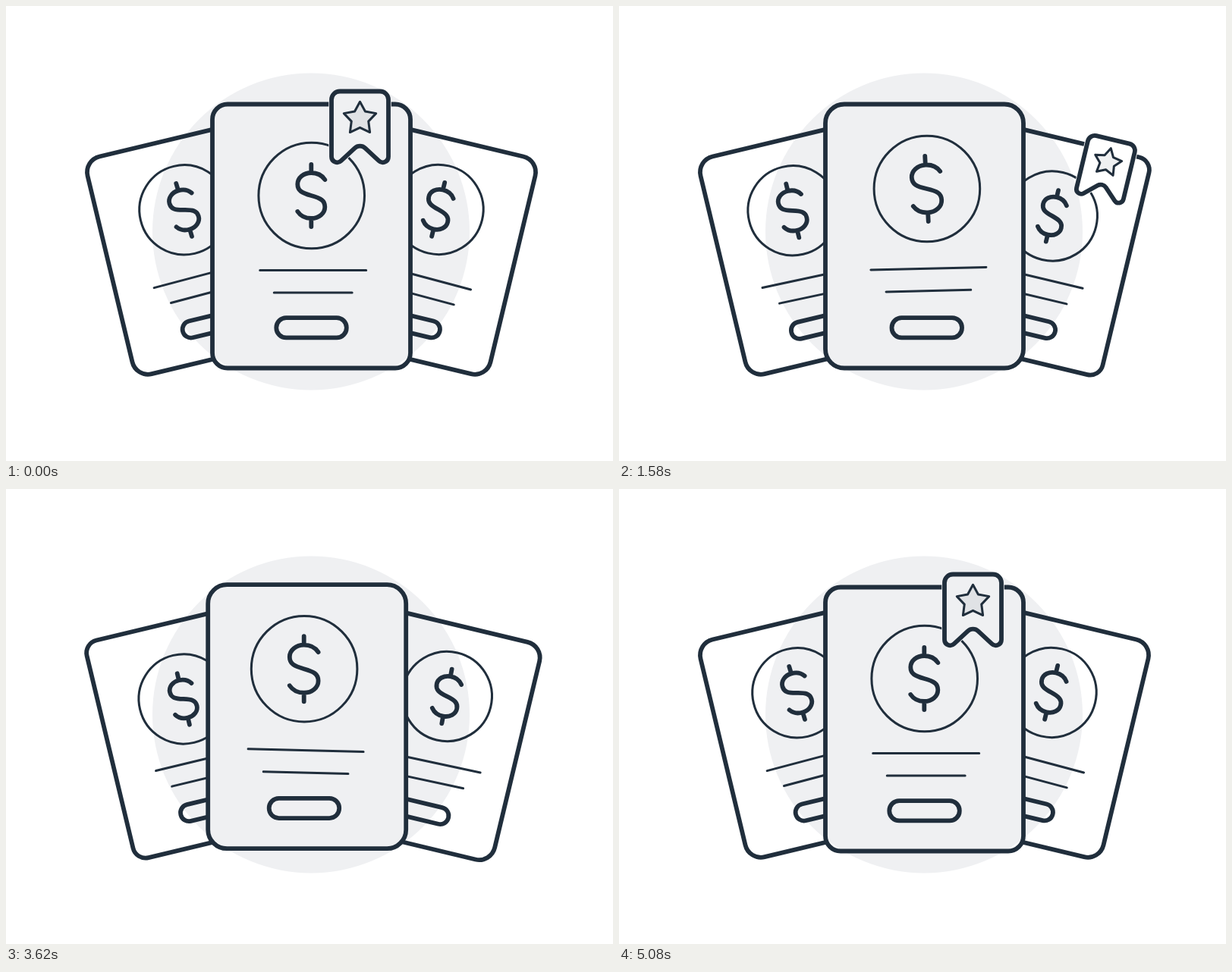
An HTML page with a canvas for the animation above (5100 ms loop, 800 by 600 pixels).

```html
<!DOCTYPE html>
<html lang="en">
<head>
<meta charset="utf-8">
<title>Pricing cards</title>
<style>
  html, body { margin: 0; width: 100%; height: 100%; overflow: hidden; background: #fff; }
  canvas { display: block; width: 800px; height: 600px; }
</style>
</head>
<body>
<canvas id="stage" width="800" height="600"></canvas>
<script>
const LOOP = 5100;
const STARTS = [220, 1920, 3570];
const INK = '#202e3c';
const BOLD = 5.8, THIN = 3;
const CENTRE = 0, RIGHT = 1, LEFT = 2;
const ctx = document.getElementById('stage').getContext('2d');
ctx.lineCap = ctx.lineJoin = 'round';

// In list order each card sits one slot further on.
const cards = [
  { radius: 20, shift: 0.2, ringY: -53.5, lineY: 45, half: 70, sign: 1, signTurn: 0, ribbon: true },
  { radius: 25, shift: -3.6, ringY: -63, lineY: 44.5, half: 76, sign: 1.05, signTurn: 0 },
  { radius: 25, shift: 3.4, ringY: -62.5, lineY: 42.7, half: 76, sign: 1.05, signTurn: -3 }
];

const radians = degrees => degrees * Math.PI / 180;

// Cubic ease in and out between two times.
function ease(t, start, end) {
  const u = Math.min(1, Math.max(0, (t - start) / (end - start)));
  return u < 0.5 ? 4 * u ** 3 : 1 - 4 * (1 - u) ** 3;
}

// Cards are filled with the backdrop itself, so they hide each other but not the disc.
function makeBackdrop() {
  const c = document.createElement('canvas');
  c.width = 800;
  c.height = 600;
  const g = c.getContext('2d');
  g.fillStyle = '#fff';
  g.fillRect(0, 0, 800, 600);
  g.fillStyle = '#eff0f2';
  g.beginPath();
  g.arc(402, 297.5, 209, 0, 7);
  g.fill();
  return ctx.createPattern(c, 'no-repeat');
}
const backdrop = makeBackdrop();

// The fan is symmetric, apart from a small drift in the last state.
function rest(state, slot) {
  const side = [0, 1, -1][slot];
  const drift = state === 2 ? [-1, 1, 0][slot] : 0;
  return {
    x: 402.5 + 158 * side + 5.8 * drift,
    y: 303.5 + 17.5 * Math.abs(side) + 3.3 * drift,
    scale: side ? 0.847 : 1,
    turn: 13.5 * side
  };
}

// Progress of each property of a card on its way out of a slot.
function progress(slot, t) {
  if (slot === CENTRE) {
    return {
      x: ease(t, 325, 930),
      y: ease(t, 200, 1040),
      scale: ease(t, 215, 1010),
      turn: ease(t, 412, 870)
    };
  }
  // The left card is nudged first, then comes in.
  const p = slot === RIGHT
    ? ease(t, 3, 973)
    : 0.046 * ease(t, 0, 500) + 0.954 * ease(t, 545, 1060);
  return { x: p, y: p, scale: p, turn: p };
}

function poseOf(state, slot, t) {
  const from = rest(state, slot), to = rest((state + 1) % 3, (slot + 1) % 3);
  const p = progress(slot, t), pose = {};
  for (const key in from) pose[key] = from[key] + (to[key] - from[key]) * p[key];
  if (slot === LEFT) pose.y -= 8 * Math.sin(Math.PI * ease(t, 400, 1360));
  return pose;
}

// Builds a path in the current space, then paints it in screen space so strokes keep their weight.
function paint(trace, width, fill, halo) {
  ctx.save();
  ctx.beginPath();
  trace();
  ctx.resetTransform();
  if (halo) {
    ctx.strokeStyle = backdrop;
    ctx.lineWidth = halo;
    ctx.stroke();
  }
  if (fill) {
    ctx.fillStyle = fill;
    ctx.fill();
  }
  ctx.strokeStyle = INK;
  ctx.lineWidth = width;
  ctx.stroke();
  ctx.restore();
}

// Runs a drawing inside a moved, turned and scaled space.
function within({ x, y, scale = 1, turn = 0 }, drawInside) {
  ctx.save();
  ctx.translate(x, y);
  ctx.rotate(radians(turn));
  ctx.scale(scale, scale);
  drawInside();
  ctx.restore();
}

// Two halves, each the other turned by 180 degrees.
function traceDollar() {
  for (const d of [1, -1]) {
    ctx.moveTo(0, 0);
    ctx.bezierCurveTo(12.5 * d, 3.5 * d, 18 * d, 6.5 * d, 18 * d, 15 * d);
    ctx.bezierCurveTo(18 * d, 23.5 * d, 10 * d, 30 * d, 0, 30 * d);
    ctx.bezierCurveTo(-8 * d, 30 * d, -14 * d, 27 * d, -18 * d, 21 * d);
    ctx.moveTo(0, 30 * d);
    ctx.lineTo(0, 41 * d);
  }
}

function traceRibbon() {
  const w = 37.5, top = -47, tip = 56.5, notch = 21.5;
  ctx.moveTo(0, top);
  ctx.arcTo(w, top, w, 0, 11);
  ctx.arcTo(w, tip, 0, notch, 7.5);
  ctx.arcTo(0, notch, -w, tip, 10);
  ctx.arcTo(-w, tip, -w, 0, 7.5);
  ctx.arcTo(-w, top, 0, top, 11);
  ctx.closePath();
}

function traceStar() {
  for (let i = 0; i < 10; i++) {
    const r = i % 2 ? 11.8 : 22.3, a = i * Math.PI / 5;
    ctx.lineTo(r * Math.sin(a), -11 - r * Math.cos(a));
  }
  ctx.closePath();
}

function drawRibbon() {
  paint(traceRibbon, BOLD, backdrop, 7.5);
  paint(traceStar, THIN, 'rgba(32,46,60,.07)');
}

function drawCard(card, ribbonSize) {
  const { radius, shift, ringY, lineY, half, sign, signTurn } = card;
  paint(() => ctx.roundRect(-130.5, -174, 261, 348, radius), BOLD, backdrop);
  paint(() => ctx.arc(shift, ringY, 69.8, 0, 7), THIN);

  // Text lines lean slightly with the shift of the content.
  const lean = -0.007 * shift;
  for (const [y, w] of [[lineY, half], [lineY + 29.5, half * 0.735]]) {
    paint(() => {
      ctx.moveTo(shift + 2 - w, y - w * lean);
      ctx.lineTo(shift + 2 + w, y + w * lean);
    }, THIN);
  }
  paint(() => ctx.roundRect(shift - 46.4, 107.6, 92.5, 26.3, 13), BOLD);

  within({ x: shift - 0.4, y: ringY, scale: sign, turn: signTurn }, () => paint(traceDollar, BOLD));
  if (card.ribbon && ribbonSize > 0) {
    within({ x: 64, y: -144, scale: ribbonSize }, drawRibbon);
  }
}

function draw(t) {
  let state = 2, phase = t + LOOP - STARTS[2];
  STARTS.forEach((start, i) => {
    if (t >= start) { state = i; phase = t - start; }
  });

  ctx.fillStyle = backdrop;
  ctx.fillRect(0, 0, 800, 600);

  // The entering card comes to the top once the leaving one has cleared it.
  const order = phase < 700 ? [RIGHT, LEFT, CENTRE] : [RIGHT, CENTRE, LEFT];
  const ribbonSize = 1 - ease(t, 3000, 3080) + ease(t, 3800, 3950);
  for (const slot of order) {
    const card = cards[(slot - state + 3) % 3];
    within(poseOf(state, slot, phase), () => drawCard(card, ribbonSize));
  }
}

const begin = performance.now();
function frame() {
  draw((performance.now() - begin) % LOOP);
  requestAnimationFrame(frame);
}
frame();
</script>
</body>
</html>
```
